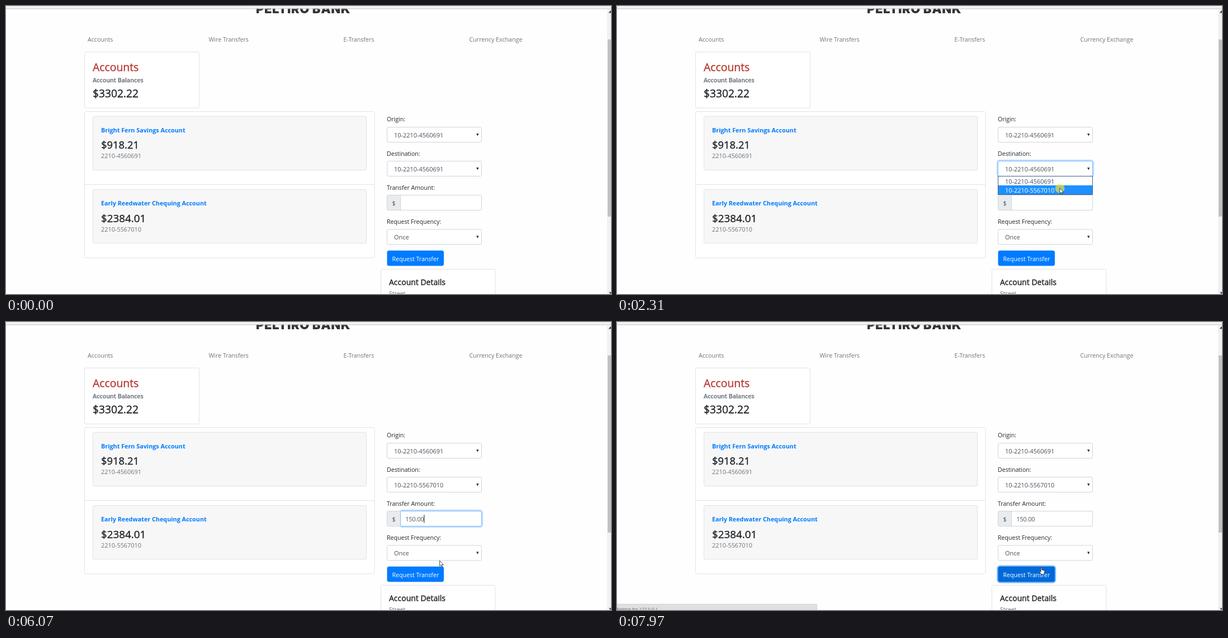
An HTML page for the animation above (8000 ms loop, 1082 px wide and 517 px high).

```html
<!DOCTYPE html>
<html lang="en">
<head>
<meta charset="utf-8">
<title>Bank transfer</title>
<style>
  html, body { margin: 0; width: 100%; height: 100%; overflow: hidden; background: #fefefe; }
  svg { display: block; width: 1082px; height: 517px; }
  text { font-family: "Open Sans", "Noto Sans", sans-serif; white-space: pre; }
</style>
</head>
<body>
<svg id="stage" viewBox="0 0 1082 517"></svg>
<script>
const stage = document.getElementById("stage");
const DURATION = 8000;
const INK = "#212529", GRAY = "#6c757d", FIELD = "#495057", BLUE = "#007bff";
const EDGE = "#e2e2e2", FIELD_EDGE = "#ced4da";
const SAVINGS = "10-2210-4560691", CHEQUING = "10-2210-5567010";

const text = (x, y, str, size = 10.6, fill = INK, extra = "") =>
  `<text x="${x}" y="${y}" font-size="${size}" fill="${fill}" ${extra}>${str}</text>`;
const medium = (x, y, str, size, fill = INK) =>
  text(x, y, str, size, fill, `stroke="${fill}" stroke-width=".4"`);
const rect = (x, y, w, h, fill, stroke = "none", extra = "") =>
  `<rect x="${x}" y="${y}" width="${w}" height="${h}" fill="${fill}" stroke="${stroke}" ${extra}/>`;
const card = (x, y, w, h, fill = "#fff") => rect(x, y, w, h, fill, EDGE, 'rx="2.5"');
const ring = (id, x, y, w, h) => rect(x, y, w, h, "none", BLUE, `id="${id}" rx="3"`);
const select = (y, value, id) =>
  rect(681.5, y, 169, 27, "#fff", FIELD_EDGE, `id="${id}Box" rx="2.5"`) +
  text(694, y + 18, value, 10.95, FIELD, `id="${id}"`) +
  `<path d="M841 ${y + 11.5}h4.6l-2.3 4.6z" fill="#333"/>`;
const account = (y, name, amount, size, number) =>
  card(155.5, y, 489, 96.5, "#f7f7f7") +
  text(170, y + 28.5, name, 10.8, BLUE, 'font-weight="700"') +
  medium(170, y + 58, amount, size) +
  text(170, y + 75, number, 10.9, GRAY);

stage.innerHTML =
  rect(0, 0, 1082, 517, "#fefefe") +
  `<text x="531.5" y="13" font-size="22" font-weight="900" letter-spacing=".6" text-anchor="middle"
    fill="#333" style="font-family:Inter,sans-serif">PELTIRO BANK</text>` +
  rect(0, 0, 1082, 4.5, "#f2f2f2") + rect(0, 4.5, 1082, 1, "#c4c4c4") +
  text(146, 64, "Accounts", 10.7, GRAY) +
  text(362.5, 64, "Wire Transfers", 10.65, GRAY) +
  text(603.5, 64, "E-Transfers", 10.6, GRAY) +
  text(828.5, 64, "Currency Exchange", 10.7, GRAY) +

  card(140.5, 82.5, 205, 100.5) +
  medium(155, 117, "Accounts", 19.4, "#b93a32") +
  text(155, 136.5, "Account Balances", 10.7, GRAY, `font-weight="600" stroke="${GRAY}" stroke-width=".25"`) +
  medium(155, 164, "$3302.22", 19.2) +

  card(140.5, 189.5, 518.5, 262.5) + rect(140.5, 320, 518.5, 1, EDGE) +
  account(198, "Bright Fern Savings Account", "$918.21", 18.4, "2210-4560691") +
  account(329.5, "Early Reedwater Chequing Account", "$2384.01", 18.8, "2210-5567010") +

  ring("destRing", 681.5, 278.5, 169, 27) +
  ring("amountRing", 705.5, 339.5, 145, 27) +
  ring("buttonRing", 682, 439.5, 100.5, 26.5) +
  text(681, 207, "Origin:") + select(217.5, SAVINGS, "origin") +
  text(681, 269, "Destination:") + select(278.5, SAVINGS, "dest") +
  text(681, 330, "Transfer Amount:") +
  rect(681.5, 339.5, 169, 27, "#e9ecef", FIELD_EDGE, 'rx="2.5"') +
  rect(705.5, 339.5, 145, 27, "#fff", FIELD_EDGE, 'id="amountBox" rx="2"') +
  text(690.5, 357.5, "$", 10.9, FIELD) +
  text(714.5, 357.5, "", 10.6, FIELD, 'id="amount"') +
  rect(714, 346, 1, 14.5, "#222", "none", 'id="caret"') +
  text(681, 391, "Request Frequency:") + select(401, "Once", "frequency") +
  rect(682, 439.5, 100.5, 26.5, BLUE, BLUE, 'id="button" rx="2.5"') +
  text(690.5, 457.5, "Request Transfer", 10.6, "#fff") +

  card(670.5, 472.5, 204.5, 80) +
  medium(685, 501, "Account Details", 14) +
  text(685, 519.5, "Street", 10.6, GRAY) +

  `<g id="popup">${rect(681.5, 305.5, 169, 33, "#fff", "#3d5f8f")}
    ${rect(682, 306, 168, 16, "#1e90ff", "none", 'id="choice"')}
    ${text(694, 318.5, SAVINGS, 10.95, FIELD, 'id="first"')}
    ${text(694, 334.5, CHEQUING, 10.95, FIELD, 'id="second"')}</g>` +

  rect(1075, 5.5, 7, 512, "#f1f1f1") + rect(1076, 60, 6, 318, "#c1c1c1") +
  `<path d="M1077.5 12.5h5v-3.5l-1.5-1zM1078 513.5h4v2.5l-1 1z" fill="#505050"/>` +

  `<g id="status">${rect(-3, 506.5, 360.5, 14, "#e0e0e0", "#d2d2d2", 'rx="2"')}
    ${text(-2.5, 517.5, "Waiting for 127.0.0.1...", 7.9, "#666")}</g>` +

  `<circle id="halo" r="8.5" fill="#f4e83c" fill-opacity=".65"/>
  <g id="cursor" stroke-linejoin="round">
    <path id="arrow" d="M0 0v9.5l2.2-2 1.6 3.5 1.5-.7-1.6-3.3h3z" fill="#fff" stroke="#222" stroke-width=".8"/>
    <path id="beam" d="M-2 -4.5h1.5l.5.5.5-.5h1.5M0 -4v8M-2 4.5h1.5l.5-.5.5.5h1.5" fill="none" stroke="#222"/>
    <path id="hand" d="M-.9 0q.9-1 1.8 0v4l4 .9q1 .3 1 1.3l-.8 3.8-.7 1.8h-4.700l-3.200-4.600q.4-1.300 1.600-.5l1 1z" fill="#fff" stroke="#222" stroke-width=".8"/>
  </g>`;

const el = {};
stage.querySelectorAll("[id]").forEach(node => el[node.id] = node);
const set = (id, name, value) => el[id].setAttribute(name, value);
const show = (id, visible) => set(id, "visibility", visible ? "visible" : "hidden");
const ramp = (t, start, length = 150) => Math.min(1, Math.max(0, (t - start) / length));
const between = (t, start, end) => t >= start && t < end;

// Pointer path: time, x, y
const path = [
  [270, 1006, 508], [470, 925, 405], [670, 840, 312], [870, 796, 278], [1070, 792, 288],
  [1520, 792, 288], [1980, 792, 327], [2410, 792, 327], [2810, 794, 355], [3110, 794, 356],
  [3250, 794, 362], [5290, 794, 362], [5390, 803, 348], [5640, 806, 370], [6000, 780, 425],
  [6380, 756.5, 444], [7220, 756.5, 444], [7600, 759, 441], [8000, 759, 441]
];
function pointerAt(t) {
  const i = Math.max(1, path.findIndex(p => p[0] >= t));
  const [a, b] = [path[i - 1], path[i]];
  const k = ramp(t, a[0], b[0] - a[0]);
  return [a[1] + (b[1] - a[1]) * k, a[2] + (b[2] - a[2]) * k];
}

const keyTimes = [3590, 3840, 4110, 4310, 4560, 4760];
const clicks = [[1370, 1520], [2310, 2410], [3010, 3100], [6620, 6680]];

function mix(from, to, k) {
  return `rgb(${from.map((c, i) => Math.round(c + (to[i] - c) * k))})`;
}

function focus(ringId, boxId, amount) {
  set(ringId, "stroke-width", 1 + amount * 4.4);
  set(ringId, "stroke-opacity", amount * (boxId ? .25 : .5));
  if (boxId) set(boxId, "stroke", mix([206, 212, 218], [128, 189, 255], amount));
}

function draw(t) {
  const [x, y] = pointerAt(t);
  const overButton = between(x, 681, 783) && between(y, 439, 467);
  const overAmount = t > 2410 && between(x, 706, 851) && between(y, 340, 367);
  show("cursor", t >= 270);
  set("cursor", "transform", `translate(${x} ${y})`);
  set("arrow", "display", overButton || overAmount ? "none" : "inline");
  set("beam", "display", overAmount ? "inline" : "none");
  set("hand", "display", overButton ? "inline" : "none");
  show("halo", clicks.some(([start, end]) => between(t, start, end)));
  set("halo", "cx", x);
  set("halo", "cy", y + .5);

  show("popup", between(t, 1520, 2410));
  const onSecond = y >= 322;
  set("choice", "y", onSecond ? 322 : 306);
  set("first", "fill", onSecond ? FIELD : "#fff");
  set("second", "fill", onSecond ? "#fff" : FIELD);
  el.dest.textContent = t < 2410 ? SAVINGS : CHEQUING;

  focus("destRing", "destBox", ramp(t, 1500) - ramp(t, 3000));
  focus("amountRing", "amountBox", ramp(t, 3050) - ramp(t, 6620));
  focus("buttonRing", null, ramp(t, 6640));

  const typed = keyTimes.filter(k => t >= k);
  el.amount.textContent = "150.00".slice(0, typed.length);
  const lastKey = typed.length ? typed[typed.length - 1] : 3010;
  show("caret", between(t, 3060, 6620) && Math.floor((t - lastKey) / 530) % 2 === 0);
  set("caret", "x", 714.3 + (typed.length ? el.amount.getComputedTextLength() : 0));

  const fill = between(t, 6640, 6830) ? "#0062cc" : mix([0, 123, 255], [0, 105, 217], ramp(t, 6230));
  set("button", "fill", fill);
  set("button", "stroke", fill);
  set("status", "opacity", ramp(t, 7220, 100));
}

const began = performance.now();
function tick() {
  draw((performance.now() - began) % DURATION);
  requestAnimationFrame(tick);
}
tick();
</script>
</body>
</html>
```
